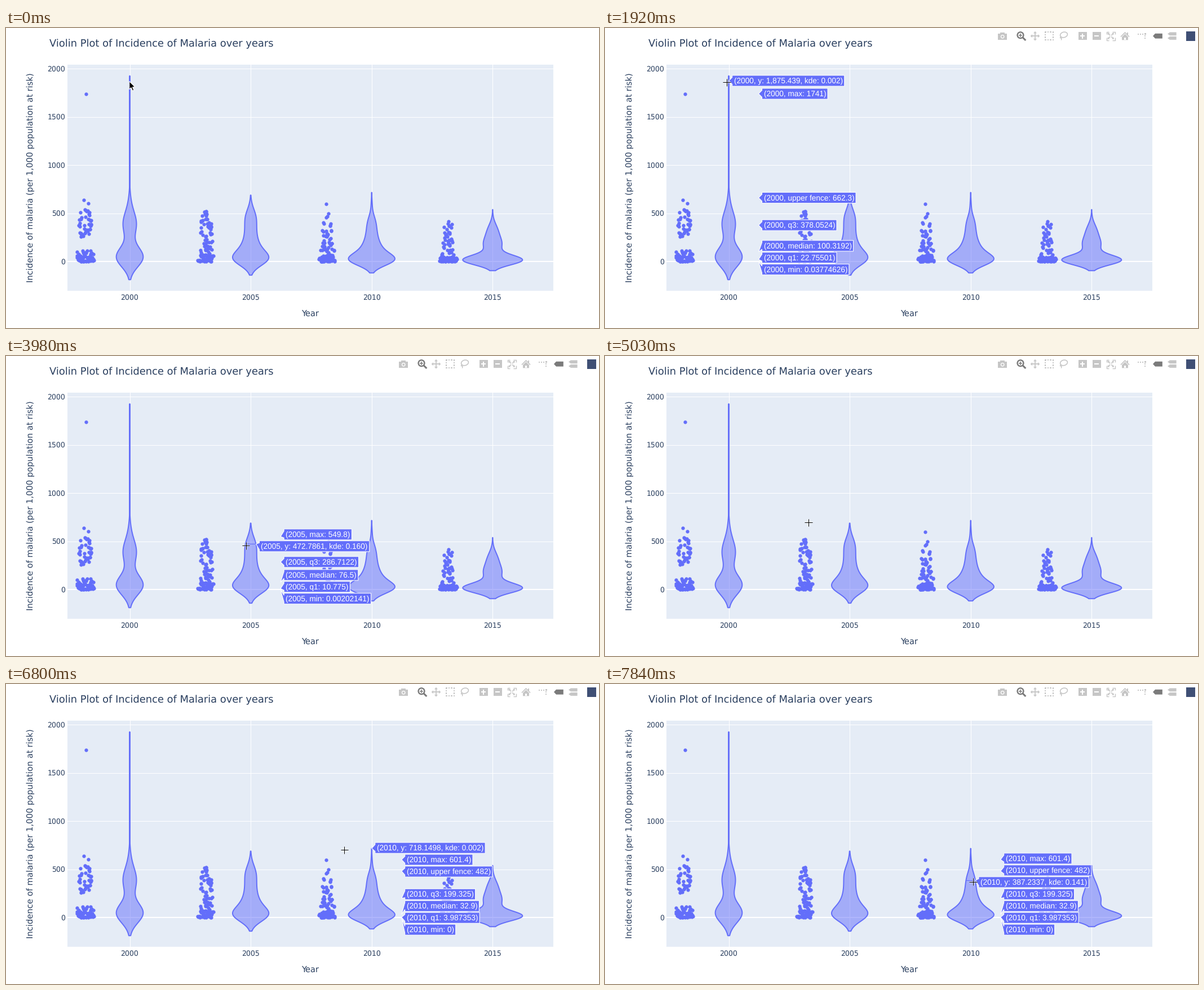
Recreate the animation shown at these times as a matplotlib script. Size 1052 by 532 pixels, loop 7.99 s.

```python
import matplotlib.pyplot as plt
import numpy as np
from matplotlib.animation import FuncAnimation
from matplotlib.patches import Circle, Ellipse, Polygon, Rectangle

W, H, DPI = 1052, 532, 64
PT = 72 / DPI                      # points per pixel
LOOP, STEP, TICKS = 7990, 34, 54
BLUE, INK, PLOT_BG = "#636efa", "#2a3f5f", "#e5ecf6"
IDLE, ACTIVE = "#c6c6c6", "#7b7b7b"
ZERO, SCALE = 414.3, 0.171         # zero line and pixels per unit
KDE_SCALE = 58.5                   # pixels of half width per unit of density
COUNTRIES = 107
PITCH, HALF_BOX = 20.95, 9.6

plt.rcParams["text.hinting"] = "none"
rng = np.random.default_rng(8)
fig = plt.figure(figsize=(W / DPI, H / DPI), dpi=DPI, facecolor="white")
ax = fig.add_axes([0, 0, 1, 1])
ax.set(xlim=(0, W), ylim=(H, 0))
ax.axis("off")


def py(value):
    return ZERO - SCALE * value


def text(x, y, s, px, color=INK, font="DejaVu Sans", **kw):
    return ax.text(x, y, s, size=px * PT, color=color, family=font,
                   va="baseline", **kw)


def seg(points, color, lw=1, z=2, **kw):
    xs, ys = zip(*points)
    return ax.plot(xs, ys, color=color, lw=lw * PT, zorder=z, **kw)[0]


def put(patch):
    return ax.add_patch(patch)


# --- violins and their points ---------------------------------------------
class Violin:
    """Density as a sum of normal bumps (height, sigma, half width) in pixels
    above the zero line, cut two bandwidths beyond the data."""

    def __init__(self, slot, peak, bandwidth, bumps):
        self.x = 219.5 + 214.6 * slot
        self.year = 2000 + 5 * slot
        self.bw = bandwidth
        self.mu, self.sigma, self.amp = np.array(bumps).T
        self.low, self.high = -2 * bandwidth, SCALE * peak + 2 * bandwidth

    def half_width(self, h):
        z = (np.asarray(h)[..., None] - self.mu) / self.sigma
        return (self.amp * np.exp(-z * z / 2)).sum(-1)

    def draw(self):
        h = np.linspace(self.low, self.high, 240)
        w, y = self.half_width(h), ZERO - h
        outline = np.c_[np.r_[self.x - w, (self.x + w)[::-1]],
                        np.r_[y, y[::-1]]]
        put(Polygon(outline, fc=BLUE, alpha=0.5, lw=0, zorder=3))
        put(Polygon(outline, fill=False, ec=BLUE, lw=1.95 * PT, zorder=3,
                    joinstyle="bevel"))

    def draw_points(self):
        # each bump is a uniform cluster blurred by the bandwidth
        spread = np.sqrt(3 * np.maximum(self.sigma ** 2 - self.bw ** 2, 0))
        weight = self.amp * self.sigma
        counts = np.rint(COUNTRIES * weight / weight.sum()).astype(int)
        mu, spread = np.repeat(self.mu, counts), np.repeat(spread, counts)
        h = np.abs(mu + spread * rng.uniform(-1, 1, mu.size))
        w = self.half_width(h)
        jitter = 15.5 * (w / w.max()) ** 0.4
        x = self.x - 79 + jitter * rng.uniform(-1, 1, mu.size)
        ax.scatter(x, ZERO - h, s=(6.3 * PT) ** 2, color=BLUE, lw=0, zorder=4)


VIOLINS = (
    Violin(0, 1741, 16, [(8, 17.4, 23.5), (67, 22.14, 11.9), (109, 16.3, .82),
                         (297.7, 16, .41)]),
    Violin(1, 549.8, 12, [(5, 12.8, 28), (26, 14, 10.9), (50, 15, 7),
                          (78, 16, 8.65)]),
    Violin(2, 601.4, 10, [(3, 10.7, 35.1), (21, 13, 14), (44, 14, 7.55),
                          (69, 14, 6.2), (102.8, 10, .66)]),
    Violin(3, 447, 8, [(2.7, 8.7, 51.3), (30, 13, 15), (55, 13, 8)]),
)

# --- axes -----------------------------------------------------------------
put(Rectangle((109, 65), 861.5, 401, fc=PLOT_BG, lw=0, zorder=0))
for violin in VIOLINS:
    seg([(violin.x, 65), (violin.x, 466)], "white", 1.05, 1)
    text(violin.x - 0.2, 482.2, str(violin.year), 12.55, ha="center")
    violin.draw()
    violin.draw_points()
for v in range(0, 2001, 500):
    seg([(109, py(v)), (970.5, py(v))], "white", 1.05 if v else 2.1, 1)
    text(105.3, py(v) + 4.5, str(v), 12.55, ha="right")
text(77, 33, "Violin Plot of Incidence of Malaria over years", 17.87)
text(539.5, 511.4, "Year", 14.65, ha="center")
text(48, 265.5, "Incidence of malaria (per 1,000 population at risk)", 14.75,
     ha="center", rotation=90, rotation_mode="anchor")

# --- mode bar -------------------------------------------------------------
MID = 14.2
SIGNS = [(sx, sy) for sx in (-1, 1) for sy in (-1, 1)]
bar = []


def icon(patch):
    patch.set_zorder(6)
    bar.append(put(patch))


def block(cx, cy, w, h, color=IDLE):
    icon(Rectangle((cx - w / 2, cy - h / 2), w, h, fc=color, lw=0))


def disc(cx, cy, r, color):
    icon(Circle((cx, cy), r, fc=color, lw=0))


def shape(points, color=IDLE):
    icon(Polygon(points, fc=color, lw=0))


def stroke(points, color=IDLE, lw=1.5):
    bar.append(seg(points, color, lw, 6, solid_capstyle="butt"))


def plus(cx, cy, r, color, lw, upright=True):
    stroke([(cx - r, cy), (cx + r, cy)], color, lw)
    if upright:
        stroke([(cx, cy - r), (cx, cy + r)], color, lw)


def tag(x, y, w, h, color):
    shape([(x, y), (x + 4, y - h), (x + w, y - h), (x + w, y + h),
           (x + 4, y + h)], color)


def camera(x):
    block(x, 15.4, 16.5, 11)
    block(x, 8.8, 8, 2.6)
    disc(x, 15.3, 3.4, "white")
    disc(x, 15.3, 2, IDLE)


def zoom(x):
    disc(x - 1, 12.7, 6.6, ACTIVE)
    disc(x - 1, 12.7, 4.2, "white")
    stroke([(x + 3, 16.7), (x + 8.3, 22)], ACTIVE, 3)
    plus(x - 1, 12.7, 3, ACTIVE, 1.5)


def pan(x):
    plus(x, MID, 6, IDLE, 1.8)
    for dx, dy in ((1, 0), (-1, 0), (0, 1), (0, -1)):
        shape([(x + a * dx - b * dy, MID + a * dy + b * dx)
               for a, b in ((8.4, 0), (4.9, 3), (4.9, -3))])


def box_select(x):
    for d in (-6.6, -2.2, 2.2, 6.6):
        for edge in (-7, 7):
            block(x + d, MID + edge, 2.6, 2)
            block(x + edge, MID + d, 2, 2.6)


def lasso(x):
    icon(Ellipse((x, 12), 13, 9.5, angle=-15, fill=False, ec=IDLE,
                 lw=1.6 * PT))
    stroke([(x - 5.4, 15), (x - 6.5, 17.5), (x - 4, 18), (x - 4.5, 21.5)])


def step_zoom(x, grow):
    block(x, MID, 15, 14.6)
    plus(x, MID, 4.3, "white", 2.1, grow)


def autoscale(x):
    for sx, sy in SIGNS:
        def at(*pts):
            return [(x + sx * a, MID + sy * b) for a, b in pts]
        stroke(at((3, 7.5), (7.5, 7.5), (7.5, 3)), lw=1.4)
        stroke(at((1, 1), (4.5, 4.5)), lw=1.7)
        shape(at((5.6, 5.6), (1.8, 5.2), (5.2, 1.8)))


def home(x):
    stroke([(x - 7.5, 15.5), (x, 8), (x + 7.5, 15.5)], lw=1.6)
    shape([(x - 5.5, 15.9), (x, 10.5), (x + 5.5, 15.9), (x + 5.5, 21.3),
           (x - 5.5, 21.3)])
    block(x, 19.2, 3, 4.3, "white")
    block(x + 4.5, 10, 2, 4)


def spikes(x):
    block(x + 5.2, 10.6, 3.2, 3.2)
    for k in (1, 2, 3):
        block(x + 5.2 - 4 * k, 10.6, 2, 2)
        if k < 3:
            block(x + 5.2, 10.6 + 3.8 * k, 2, 2)


camera(705.2)
zoom(738)
pan(763)
box_select(788.3)
lasso(814)
step_zoom(847, True)
step_zoom(872, False)
autoscale(897.2)
home(922.5)
spikes(953)
tag(972, MID, 16.8, 4.4, ACTIVE)
for y in (10.4, 18):
    tag(998, y, 15.6, 2.9, IDLE)
block(1039, 14.4, 16.4, 16.4, "#3f4f75")

# --- hover labels ---------------------------------------------------------
STATS = (
    "max: 1741|upper fence: 662.3|q3: 378.0524|median: 100.3192"
    "|q1: 22.75501|min: 0.03774626",
    "max: 549.8|q3: 286.7122|median: 76.5|q1: 10.775|min: 0.00202141",
    "max: 601.4|upper fence: 482|q3: 199.325|median: 32.9"
    "|q1: 3.987353|min: 0",
)


def spread_out(anchors):
    """Least shift of sorted anchors that keeps them one pitch apart."""
    groups = []
    for i, a in enumerate(anchors):
        groups.append((a - i * PITCH, 1))
        while len(groups) > 1 and groups[-2][0] > groups[-1][0]:
            (m2, n2), (m1, n1) = groups.pop(), groups.pop()
            groups.append(((m1 * n1 + m2 * n2) / (n1 + n2), n1 + n2))
    means = [m for m, n in groups for _ in range(n)]
    return [m + i * PITCH for i, m in enumerate(means)]


class Label:
    def __init__(self, z):
        self.box = put(Polygon([(0, 0)] * 3, fc=BLUE, ec="white", lw=1.05 * PT,
                               zorder=z))
        self.text = text(0, 0, "", 13.57, "white", "Liberation Sans",
                         zorder=z + 0.5)

    def set_visible(self, on):
        self.box.set_visible(on)
        self.text.set_visible(on)

    def show(self, x, y, mid, s):
        self.set_visible(True)
        self.text.set_text(s)
        self.text.set_position((x + 9, mid + 4.8))
        left = x + 6
        right = left + self.text.get_window_extent().width + 6
        top, bottom = mid - HALF_BOX, mid + HALF_BOX
        self.box.set_xy([(x, y), (left, mid + 6), (left, bottom),
                         (right, bottom), (right, top), (left, top),
                         (left, mid - 6)])


labels = [Label(10 + i) for i in range(7)]
hover_line = seg([(0, 0), (0, 0)], BLUE, 1.05, 5)


def hover(x, value):
    """Label the violin nearest to x, if the value lies within its span."""
    for item in labels + [hover_line]:
        item.set_visible(False)
    violin, stats = min(zip(VIOLINS, STATS), key=lambda p: abs(x + 2 - p[0].x))
    h = SCALE * value
    if not violin.low <= h <= violin.high:
        return
    y, w = py(value), violin.half_width(h)
    hover_line.set_visible(True)
    hover_line.set_data([violin.x - w, violin.x + w], [y, y])
    rows = [(py(float(s.split(": ")[1])), violin.x + 53, s)
            for s in stats.split("|")]
    rows.append((y, violin.x + w, f"y: {value:,.7g}, kde: {w / KDE_SCALE:.3f}"))
    rows.sort()
    mids = spread_out([r[0] for r in rows])
    for label, (a, tip, s), mid in zip(labels, rows, mids):
        label.show(tip, a, mid, f"({violin.year}, {s})")


# --- pointer --------------------------------------------------------------
ARROW = np.array([(0, 0), (0, 14.2), (3.2, 11.3), (5.7, 16.8), (8.1, 15.7),
                  (5.7, 10.4), (10.2, 10.2)])
arrow = put(Polygon(ARROW + (218.8, 94.5), fc="black", ec="white", lw=1.1 * PT,
                    zorder=30))
cross = [seg([(0, 0), (0, 0)], color, lw, z, alpha=alpha,
             solid_capstyle="butt")
         for color, lw, z, alpha in (("white", 2.6, 30, .6), ("black", 1, 31, 1))
         for _ in "hv"]

# first tick, last tick, x, value under the pointer
START = (218.5, 1880)
MOVES = ((2, 6, 215.5, 1737.74), (10, 13, 216, 1875.439),
         (15, 17, 204, 378.3626), (18, 19, 215.5, 656.1127),
         (23, 27, 425.5, 472.7861), (32, 34, 361, 712),
         (38, 40, 540, 668.3345), (41, 43, 573, 795),
         (46, 48, 654.5, 564.4494), (49, 53, 653, 387.2337))


def pointer(tick):
    x, value = START
    for first, last, x1, v1 in MOVES:
        p = np.clip((tick - first + 1) / (last - first + 1), 0, 1)
        x, value = x + (x1 - x) * p, value + (v1 - value) * p
    return x, value


def draw(i):
    tick = int((i * STEP + STEP - 1) * TICKS / LOOP)
    active = tick >= MOVES[0][0]
    arrow.set_visible(not active)
    for item in bar + cross + labels + [hover_line]:
        item.set_visible(active)
    if not active:
        return
    x, value = pointer(tick)
    y = py(value) + 2.7
    for k, line in enumerate(cross):
        dx, dy = ((0, 6.6) if k % 2 else (6.6, 0))
        line.set_data([x - dx, x + dx], [y - dy, y + dy])
    hover(x, value)


anim = FuncAnimation(fig, draw, frames=LOOP // STEP, interval=STEP,
                     repeat=True, repeat_delay=0)
plt.show()
```
